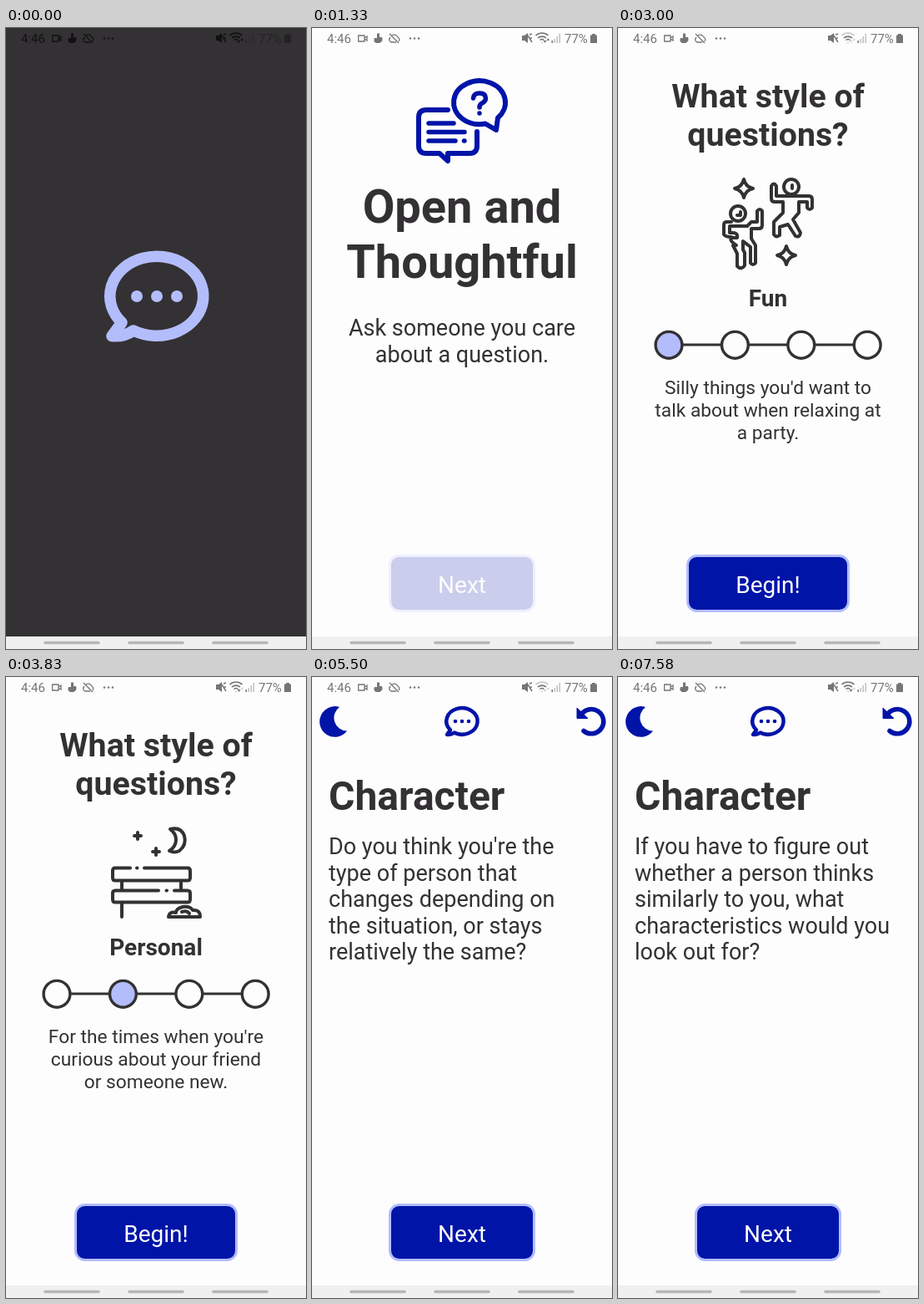
An HTML page for the animation above (8 s loop, 360 px wide and 743 px high).

```html
<!DOCTYPE html>
<html lang="en">
<head>
<meta charset="utf-8">
<title>Conversation cards</title>
<style>
  html, body { margin: 0; width: 100%; height: 100%; overflow: hidden; background: #fefdfe; }
  svg { display: block; width: 100%; height: 100%; }
  text { font-family: Roboto, "Liberation Sans", sans-serif; fill: #333133; white-space: pre; }
  .bold { font-weight: 700; }
  .mid { text-anchor: middle; }
  .line { fill: none; stroke: #333133; stroke-width: 4; stroke-linecap: round; stroke-linejoin: round; }
  .blue { stroke: #0014a8; }
</style>
</head>
<body>
<svg id="stage" viewBox="0 0 360 743">
  <defs>
    <g id="bubble">
      <path d="M153 362A56 47.5 0 1 0 139 352.4L127 368.5Q141 370 153 362Z" fill="none"
        stroke="currentColor" stroke-width="13.6" stroke-linejoin="round"/>
      <g fill="currentColor">
        <circle cx="157" cy="321" r="7"/><circle cx="181" cy="321" r="7"/><circle cx="205" cy="321" r="7"/>
      </g>
    </g>
    <path id="sparkle" d="M0-11Q2-2 11 0Q2 2 0 11Q-2 2-11 0Q-2-2 0-11Z"/>
    <path id="flower" d="M0-6V-2M0 2V6M-6 0H-2M2 0H6" stroke-width="4" stroke-linecap="butt"/>
    <path id="plus" d="M0-4V4M-4 0H4"/>
  </defs>

  <rect id="back" width="360" height="743"/>

  <g id="splash" color="#b3bdfb"><use href="#bubble"/></g>

  <g id="intro">
    <g class="line blue" style="stroke-width:6">
      <path d="M163 98H137Q128 98 128 107V141Q128 150 137 150H153L163 159V150H189Q198 150 198 141V124"/>
      <path d="M140 114H170M140 124.5H183M140 135H172M182.5 135H183" style="stroke-width:5.5"/>
      <path d="M208 114.500A31 26 0 1 1 223 107.500L221 122L208 114.500Z"/>
      <path d="M193.500 84Q194 78 201 78Q208.500 78 208.500 84.500Q208 88 204 90Q201 91.500 201 95M201 102V102.100" style="stroke-width:5.500"/>
    </g>
  </g>

  <g id="styles">
    <g id="planet" class="line">
      <g transform="rotate(-45 175 229)"><ellipse cx="175" cy="229" rx="60" ry="20"/></g>
      <g transform="rotate(-45 187 240)"><ellipse cx="187" cy="240" rx="60" ry="20"/></g>
      <circle cx="183" cy="238" r="40.500" fill="#fefdfe"/>
      <path transform="rotate(-45 175 229)" d="M115 229A60 20 0 0 0 235 229"/>
      <path transform="rotate(-45 187 240)" d="M127 240A60 20 0 0 0 247 240"/>
      <circle cx="205" cy="224" r="3.500" fill="#fefdfe" stroke-width="3.500"/>
      <circle cx="189" cy="264" r="3.500" fill="#fefdfe" stroke-width="3.500"/>
      <path d="M152 238A31 31 0 0 1 175 208M180 206H183M186 214H197M169 231H190M146 246H157M162 246H176M201 260H210M212 251H221"
        stroke-linecap="butt"/>
      <use href="#flower" x="140" y="195"/><use href="#flower" x="229" y="185"/>
      <use href="#flower" x="222" y="272"/><use href="#flower" x="130" y="284"/>
      <path d="M164 190H168M125 218H129M231 248H235M198 284H202" stroke-linecap="butt"/>
    </g>
    <g id="dancers" class="line">
      <use href="#sparkle" x="151" y="192"/><use href="#sparkle" x="202" y="272"/>
      <circle cx="144" cy="222" r="9"/><circle cx="208" cy="190" r="9"/>
      <path d="M147 220V224H143M209 188V192"/>
      <path d="M190 201H229Q233 201 233 205V215Q230 219 227 215V208H217V221L210 229L219 245Q218 251 213 249L204 235L194 238V248Q190 251 187 247V232L198 221V208H188Q184 208 184 204V189Q187 184 190 189Z"/>
      <path d="M167 219Q170 215 173 219V236Q173 240 169 240H160V252L165 260V281Q162 285 159 281V262L150 255V265L152 269V284Q148 290 143 285V270L138 260H142Q135 256 135 251H143Q144 245 138 245H134V237H155L160 232H167ZM136 232H130Q127 232 127 236V247Q129 250 136 250"/>
    </g>
    <g id="bench" class="line">
      <use href="#plus" x="158" y="190"/><use href="#plus" x="180" y="209"/>
      <path d="M197 182Q210 179 214 190Q217 201 208 208Q202 211 196 208Q204 203 204 195Q204 187 197 182Z"/>
      <path d="M149 228.500H131Q128 228.500 128 232V240Q128 243.500 131 243.500H218Q221 243.500 221 240V232Q221 228.500 218 228.500H166M157 228.500H157.500"/>
      <path d="M183 255.500H131Q128 255.500 128 259V266Q128 269.500 131 269.500H218Q221 269.500 221 266V259Q221 255.500 218 255.500H202M192.500 255.500H193"/>
      <path d="M139 245V254M210 245V254M139 271V287M195 287H233Q233 278 224 279Q221 274 212 275Q204 277 204 282Q196 280 195 287ZM211 281Q217 279 220 283"/>
    </g>
    <path class="line" d="M61 379H299" style="stroke-width:3"/>
    <g id="dots"></g>
  </g>

  <g id="card">
    <g fill="#0014a8">
      <path d="M33 36A18.300 18.300 0 1 0 42 64.500A15.700 15.700 0 0 1 33 36Z"/>
      <path d="M318 37V49.500H331Z" stroke="#0014a8" stroke-linejoin="round"/>
    </g>
    <path d="M322.500 46A14.600 14.600 0 1 1 326 64.500" class="line blue" style="stroke-width:5.600"/>
    <use href="#bubble" color="#0014a8" transform="translate(119.700 -54) scale(.3333)"/>
  </g>

  <g id="button">
    <rect id="face" y="631.500" height="66" rx="11" fill="#0014a8" stroke="#b3bdfb" stroke-width="3"/>
    <text id="action" class="mid" x="180" y="675.500" font-size="28" style="fill:#fff"></text>
  </g>

  <g id="status">
    <text class="ink" x="18" y="17.800" font-size="15">4:46</text>
    <g fill="none" class="pen" stroke-width="1.300">
      <path d="M55.700 9H63V16H55.700ZM63 12L66 10V15L63 13"/>
      <path d="M95 9.500Q100 6 103 11Q106 13 104 16M101 17H95Q91 15 94 11M93 7L104 18"/>
      <path d="M259 9L264 17M261 8L264 7M262 12H264" stroke-width="1.500"/>
    </g>
    <g class="ink">
      <path d="M78 6.500H81V11H84Q86 16 81 18H77Q73 16 75 12H78Z"/>
      <circle cx="118" cy="12.500" r="1.200"/><circle cx="123" cy="12.500" r="1.200"/><circle cx="128" cy="12.500" r="1.200"/>
      <path d="M252 9H255L259 6V18L255 15H252Z"/>
    </g>
    <g id="wifi" fill="none" class="pen" stroke-width="1.600">
      <path id="wave" d="M268.500 9A11 11 0 0 1 283.500 9"/>
      <path d="M271 12A7.500 7.500 0 0 1 281 12M273.500 14.500A4 4 0 0 1 278.500 14.500M276 17V17.500"/>
    </g>
    <path id="down" class="ink" d="M277.500 15H281.500L279.500 18Z"/>
    <path id="up" class="ink" d="M281.500 15H285L283.300 12Z"/>
    <g id="faint">
      <path class="ink" opacity=".45" d="M290.500 18V13H292V18ZM293.500 18V10H295V18ZM296.500 18V7H298V18Z"/>
      <path class="ink" d="M287.500 18V15H289V18Z"/>
      <text class="ink" x="303" y="17.800" font-size="15">77%</text>
      <path class="ink" d="M336 7H340V8.500H342V18H334V8.500H336Z"/>
    </g>
  </g>

  <rect y="728" width="360" height="15" fill="#f0f0f0"/>
  <path d="M47 735.500H111M148 735.500H212M249 735.500H313" stroke="#b6b6b6" stroke-width="3.600" stroke-linecap="round"/>
</svg>

<script>
const LOOP = 8000, STEP = 1000 / 12;
const $ = id => document.getElementById(id);

function add(parent, tag, attrs) {
  const el = document.createElementNS("http://www.w3.org/2000/svg", tag);
  for (const key in attrs) el.setAttribute(key, attrs[key]);
  return parent.appendChild(el);
}

function block(parent, lines, x, y, size, pitch, cls) {
  const group = add(parent, "g", {});
  lines.forEach((line, i) => {
    add(group, "text", { x, y: y + i * pitch, "font-size": size, class: cls }).textContent = line;
  });
  return group;
}

const show = (el, on) => { el.style.display = on ? "" : "none"; };
const easeInOut = p => p < .5 ? 2 * p * p : 1 - 2 * (1 - p) * (1 - p);

block($("intro"), ["Open and", "Thoughtful"], 180, 233, 56, 66, "mid bold");
block($("intro"), ["Ask someone you care", "about a question."], 180, 368, 27, 31.6, "mid");
block($("styles"), ["What style of", "questions?"], 180, 94.500, 39.300, 46, "mid bold");

// Each option: icon, dot index, time chosen
const options = [
  { icon: "planet", dot: 2, from: 1580, name: "Deep",
    lines: ["The earth-shattering", "questions you'd ask on a", "midnight drive."] },
  { icon: "dancers", dot: 0, from: 3000, name: "Fun",
    lines: ["Silly things you'd want to", "talk about when relaxing at", "a party."] },
  { icon: "bench", dot: 1, from: 3750, name: "Personal",
    lines: ["For the times when you're", "curious about your friend", "or someone new."] }
];
for (const o of options) {
  o.text = add($("styles"), "g", {});
  block(o.text, [o.name], 180, 333, 28, 0, "mid bold");
  block(o.text, o.lines, 180, 438, 22.75, 27, "mid");
}

const dots = [0, 1, 2, 3].map(i => add($("dots"), "circle", {
  cx: 61 + i * 79.4, cy: 379.3, stroke: "#333133", "stroke-width": 3.4
}));

block($("card"), ["Character"], 20, 159, 48, 0, "bold");
const questions = [
  ["Do you think you're the", "type of person that", "changes depending on", "the situation, or stays", "relatively the same?"],
  ["If you have to figure out", "whether a person thinks", "similarly to you, what", "characteristics would you", "look out for?"]
].map(lines => block($("card"), lines, 20, 212, 27, 31.5));

function pressOpacity(t) {
  if ((t >= 1330 && t < 1580) || (t >= 4830 && t < 5080)) return .2;
  if (t < 7000) return 1;
  const step = Math.floor((t - 7000 + 4) / STEP);
  return .2 + .8 * easeInOut(Math.min(1, step / 5));
}

function drawStatus(t, dark) {
  const ink = dark ? "#111" : "#757575";
  document.querySelectorAll(".ink").forEach(el => { el.style.fill = ink; });
  document.querySelectorAll(".pen").forEach(el => { el.style.stroke = ink; });
  $("faint").setAttribute("opacity", dark ? .45 : 1);
  const weak = (t >= 2500 && t < 3500) || (t >= 5500 && t < 6500);
  $("wave").setAttribute("opacity", weak ? .4 : 1);
  $("down").setAttribute("opacity", t < 2500 || (t >= 3500 && t < 4500) || t >= 6500 ? 1 : .3);
  $("up").setAttribute("opacity", t < 2500 ? 1 : .3);
}

function drawStyles(t) {
  const current = options.filter(o => t >= o.from).pop() || options[0];
  for (const o of options) {
    show($(o.icon), o === current);
    show(o.text, o === current);
  }
  const age = t - current.from;
  const radius = age < 250 ? 15.900 : age < 330 ? 17.300 : 18.500;
  dots.forEach((dot, i) => {
    const on = i === current.dot;
    dot.setAttribute("r", on ? radius : 15.900);
    dot.setAttribute("fill", on ? "#b3bdfb" : "#fefdfe");
  });
}

function draw(t) {
  const screen = t < 80 ? "splash" : t < 1580 ? "intro" : t < 5080 ? "styles" : "card";
  for (const id of ["splash", "intro", "styles", "card"]) show($(id), id === screen);
  const dark = screen === "splash";
  $("back").setAttribute("fill", dark ? "#333133" : "#fefdfe");
  drawStatus(t, dark);
  drawStyles(t);
  questions.forEach((q, i) => show(q, i === (t < 7080 ? 0 : 1)));

  const half = screen === "styles" ? 96.500 : 86.500;
  show($("button"), !dark);
  $("face").setAttribute("x", 180 - half);
  $("face").setAttribute("width", half * 2);
  $("action").textContent = screen === "styles" ? "Begin!" : "Next";
  $("button").setAttribute("opacity", pressOpacity(t));
}

const start = performance.now();
function tick() {
  draw((performance.now() - start) % LOOP);
  requestAnimationFrame(tick);
}
tick();
</script>
</body>
</html>
```
